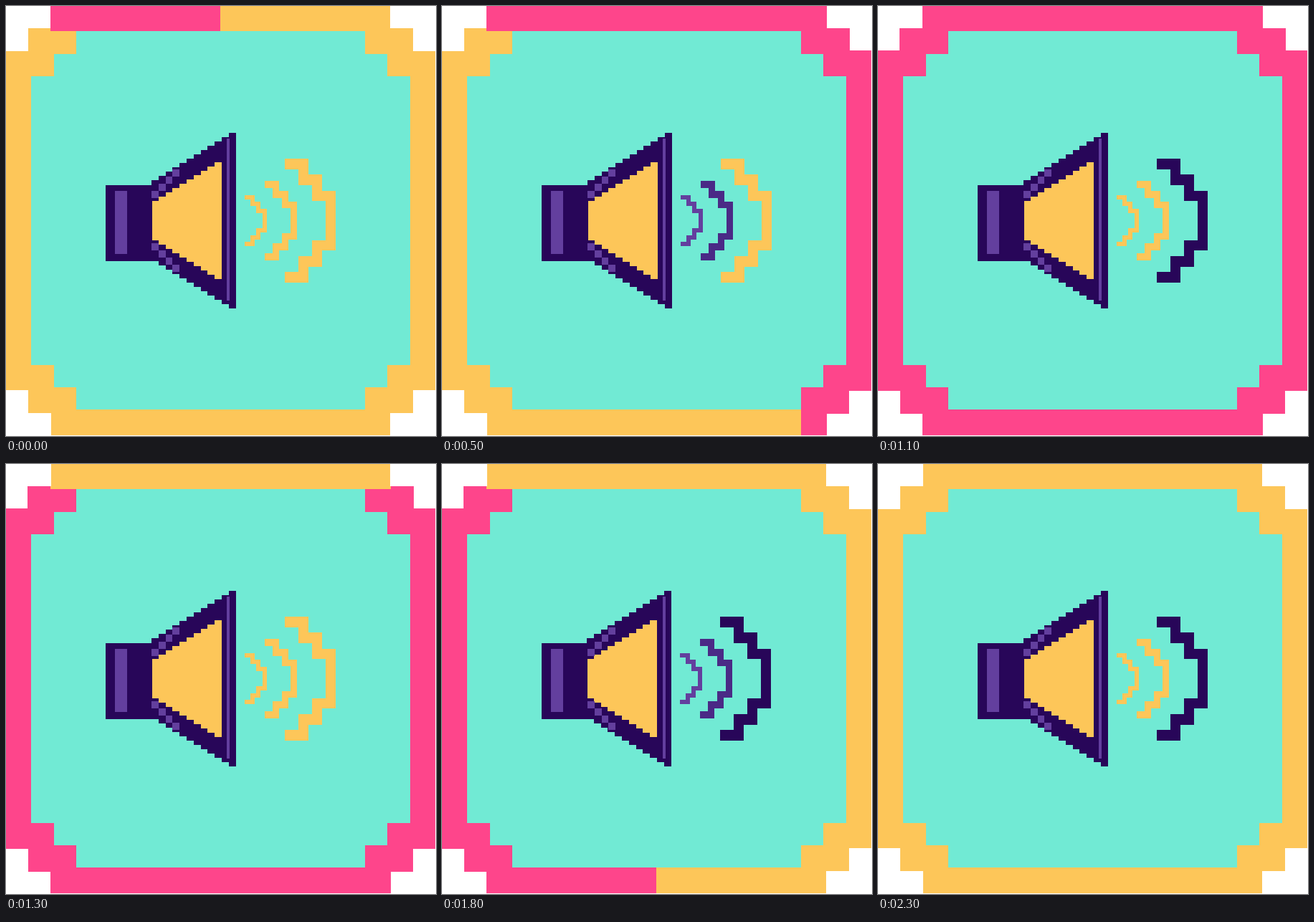
Recreate the animation shown at these times as an HTML page. Size 600x600 px, loop 2400 ms.

```html
<!DOCTYPE html>
<html lang="en">
<head>
<meta charset="utf-8">
<title>Pixel speaker</title>
<style>
  :root { --yellow: #fdc659; --pink: #fe458b; --teal: #71ead4; --navy: #280659; --violet: #633f9e; }
  html, body { margin: 0; width: 100%; height: 100%; overflow: hidden; background: #fff; }
  svg { display: block; width: 100%; height: 100%; shape-rendering: crispEdges; }

  .yellow { fill: var(--yellow); }
  .navy { fill: var(--navy); }
  .violet { fill: var(--violet); }

  /* Each border piece is pink for half the loop, one step after its neighbour. */
  .border path {
    fill: var(--pink);
    animation: lit 2400ms step-end infinite;
    animation-delay: calc(var(--i) * 100ms - 2400ms);
  }
  @keyframes lit { 0% { visibility: visible; } 50%, 100% { visibility: hidden; } }

  .wave {
    animation: pulse 1200ms step-end infinite;
    animation-delay: calc(var(--i) * 200ms - 1200ms);
  }
  @keyframes pulse { 0% { fill: var(--on); } 50%, 100% { fill: var(--yellow); } }

  /* One-pixel twitch for a single step. */
  .nudge { animation: nudge 2400ms step-end -600ms infinite; }
  @keyframes nudge { 0% { transform: translateX(-1px); } 4.16666%, 100% { transform: none; } }
</style>
</head>
<body>
<svg viewBox="0 0 600 600">
  <path class="yellow" d="M63 0H536V31H568V63H599V536H568V568H536V599H63V568H31V536H0V63H31V31H63z"/>

  <g class="border">
    <path style="--i:0" d="M62 0H299V35H62z"/>
    <path style="--i:1" d="M299 0H537V35H299z"/>
    <path style="--i:2" d="M501 35H537V31H569V62H599V98H532V67H501z"/>
    <path style="--i:3" d="M564 98H599V284H564z"/>
    <path style="--i:4" d="M564 284H599V501H564z"/>
    <path style="--i:5" d="M532 501H599V537H568V569H537V599H501V532H532z"/>
    <path style="--i:6" d="M299 563H501V599H299z"/>
    <path style="--i:7" d="M62 563H299V599H62z"/>
    <path style="--i:8" d="M31 501H67V532H98V563H62V569H31z"/>
    <path style="--i:9" d="M0 284H35V501H31V537H0z"/>
    <path style="--i:10" d="M0 62H35V284H0z"/>
    <path style="--i:11" d="M30 31H62V35H98V67H67V98H35V62H30z"/>
  </g>

  <path fill="var(--teal)" d="M98 35H501V67H532V98H564V501H532V532H501V563H98V532H67V501H35V98H67V67H98z"/>

  <path class="navy" d="M139 250H213V356H139z"/>
  <path class="violet" d="M152 258H169V346H152z"/>

  <g class="nudge">
    <path class="navy" d="M203 243h9.8v-6h9.8v-6h9.8v-6h9.8v-6h9.8v-6h9.8v-6h9.8v-6h9.8v-6h9.8v-6h9.8v-6h9.8v-6h9.8
      V422h-9.8v-6h-9.8v-6h-9.8v-6h-9.8v-6h-9.8v-6h-9.8v-6h-9.8v-6h-9.8v-6h-9.8v-6h-9.8v-6h-9.8v-6h-9.8z"/>
    <path class="yellow" d="M203.6 272h9.2v-6h9.8v-6h9.8v-6h9.8v-6h9.8v-6h9.8v-6h9.8v-6h9.8v-6h9.8v-6h9.8
      V381h-9.8v-6h-9.8v-6h-9.8v-6h-9.8v-6h-9.8v-6h-9.8v-6h-9.8v-6h-9.8v-6h-9.8v-6h-9.2z"/>

    <g class="wave" style="--i:1; --on:#633f9e">
      <path id="small" d="M333 264H347V273H355V283H364V300H358V289H349V279H341V270H333z"/>
      <use href="#small" transform="matrix(1 0 0 -1 0 599)"/>
    </g>
    <g class="wave" style="--i:2; --on:#4a2a86">
      <path id="medium" d="M361 244H381V258H394V273H406V300H397V282H385V268H372V254H361z"/>
      <use href="#medium" transform="matrix(1 0 0 -1 0 599)"/>
    </g>
    <g class="wave" style="--i:3; --on:#280659">
      <path id="large" d="M389 213H422V235H441V258H460V300H446V272H427V250H408V228H389z"/>
      <use href="#large" transform="matrix(1 0 0 -1 0 599)"/>
    </g>
  </g>

  <g class="violet">
    <path d="M308 185H312V411H308z"/>
    <path id="studs" d="M203 258h10v10h-10zM213 248h10v10h-10zM223 238h9v10h-9zM232 228h10v10h-10z"/>
    <use href="#studs" transform="matrix(1 0 0 -1 0 599)"/>
  </g>
</svg>
</body>
</html>
```
